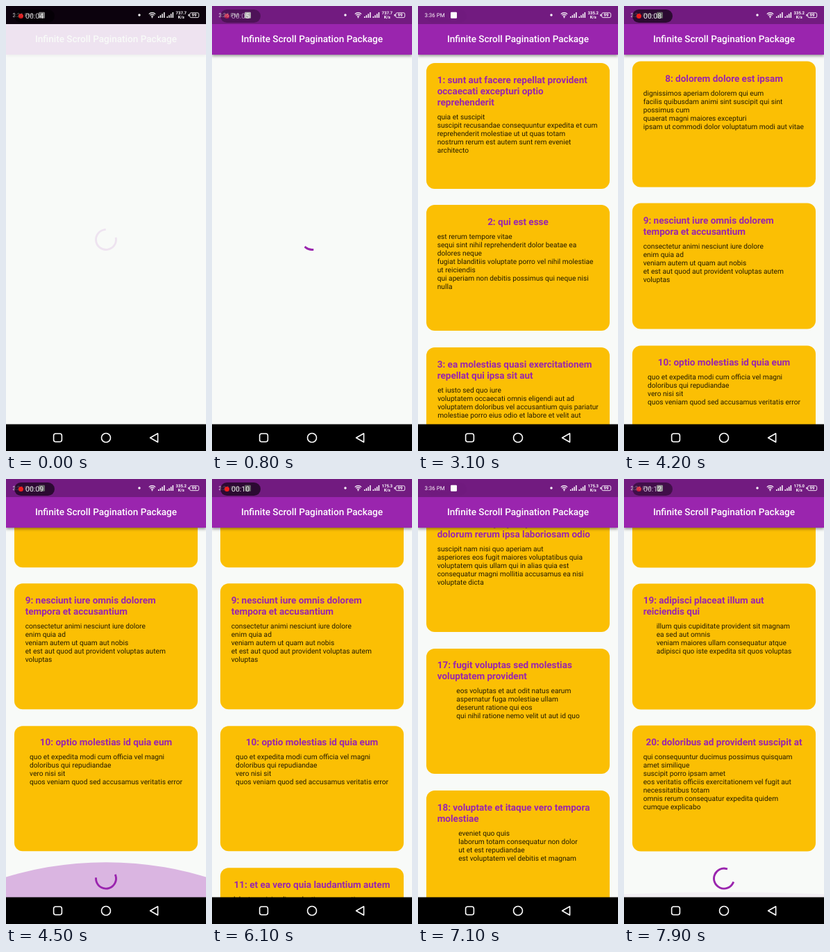
Write an HTML page that moves like this. It is 288 by 640 pixels and loops after 8 s.

```html
<!DOCTYPE html>
<html lang="en">
<head>
<meta charset="utf-8">
<title>Infinite scroll</title>
<style>
  html, body { margin: 0; width: 100%; height: 100%; overflow: hidden; }
  body { position: relative; background: #f8faf8; font-family: Roboto, Arial, sans-serif; text-rendering: geometricPrecision; }
  #app, #view { position: absolute; left: 0; top: 0; width: 288px; }
  #app { height: 640px; overflow: hidden; }
  #black { position: absolute; width: 288px; height: 25.5px; background: #000; }
  #fade { position: absolute; inset: 0; }
  #view { height: 601.5px; overflow: hidden; }
  #list { position: absolute; left: 0; top: 0; width: 288px; }
  .card { position: absolute; left: 11.73px; width: 264.54px; height: 180.8px; border-radius: 12px; background: #fbbf04;
    box-sizing: border-box; padding-top: 16.8px; display: flex; flex-direction: column; align-items: center; }
  .card > * { margin: 0; max-width: 232.6px; white-space: pre-line; }
  .card h2 { font: 700 13.5px/16px Roboto, Arial, sans-serif; color: #9a25ae; margin-bottom: 8px; }
  .card p { font-size: 10.2px; line-height: 12px; color: rgba(0, 0, 0, .86); }
  #bar { position: absolute; top: 25.5px; width: 288px; height: 44.5px; background: #9a25ae; color: #fff;
    box-shadow: 0 1.5px 4px rgba(0, 0, 0, .4); text-align: center; font-weight: 500; font-size: 13.55px; line-height: 45px; white-space: nowrap; }
  #status { position: absolute; width: 288px; height: 25.5px; background: #721b80; }
  svg { position: absolute; left: 0; top: 0; }
  #rec { position: absolute; left: 12px; top: 5px; width: 58px; height: 19px; border-radius: 10px; background: rgba(0, 0, 0, .62);
    color: #eee; font-size: 10.5px; line-height: 19px; text-indent: 16px; }
  #rec::before { content: ""; position: absolute; left: 5.5px; top: 6px; width: 7px; height: 7px; border-radius: 50%; background: #f01c1c; }
</style>
</head>
<body>
<div id="app">
  <div id="black"></div>
  <div id="fade">
    <div id="view">
      <div id="list"></div>
      <svg width="288" height="602">
        <g id="spinner"><circle id="arc" r="14.5" pathLength="360" fill="none" stroke="#9a25ae" stroke-width="2.9" stroke-linecap="square"/></g>
        <ellipse id="glow" cx="144" rx="432" fill="#9a25ae"/>
      </svg>
    </div>
    <div id="bar">Infinite Scroll Pagination Package</div>
    <div id="status"></div>
  </div>
  <svg width="288" height="640" fill="#fff" font-family="Roboto, Arial, sans-serif">
    <text x="9.5" y="16" font-size="7.9">3:36 PM</text>
    <rect x="47" y="8.7" width="9" height="9" rx="1.2"/>
    <circle cx="192" cy="13" r="1.7"/>
    <g fill="none" stroke="#fff" stroke-width="1.1">
      <path d="M205.8 11.6a6.5 6.5 0 0 1 9.4 0M207.4 13.4a4.3 4.3 0 0 1 6.2 0M209 15.1a2.2 2.2 0 0 1 3 0"/>
    </g>
    <circle cx="210.5" cy="16.4" r=".9"/>
    <g id="signal"></g>
    <g font-weight="700" text-anchor="middle">
      <text id="speed" x="252.3" y="12.3" font-size="6"></text>
      <text x="252.3" y="18.2" font-size="6">K/s</text>
      <text x="271" y="15.3" font-size="6">99</text>
    </g>
    <rect x="264.7" y="9.8" width="13" height="6.8" rx="1.8" fill="none" stroke="#fff" stroke-width=".9"/>
    <rect x="262.4" y="11.7" width="1.4" height="3" rx=".6"/>
    <rect y="601.5" width="288" height="38.5" fill="#000"/>
    <g fill="none" stroke="#fff" stroke-width="1.6" stroke-linejoin="round">
      <rect x="68.6" y="615" width="11.8" height="11.8" rx="3"/>
      <circle cx="144" cy="621" r="6.5"/>
      <path d="M207.6 621L218.6 614.8V627.2Z"/>
    </g>
  </svg>
  <div id="rec"></div>
</div>
<script>
const LOOP = 8000, STEP = 100, PITCH = 204.27, TOP = 82.2;
const SHOWN = 2900, MORE = 5500;
const END1 = TOP + 9 * PITCH - 354.8, END2 = TOP + 19 * PITCH - 354.8;
const flings = [
  { at: 3350, stop: 4300, from: 0, to: END1, v: 2 },
  { at: 6250, stop: 7885, from: END1, to: END2, v: 2.4235 }
];

// title / body lines
const posts = `sunt aut facere repellat provident occaecati excepturi optio reprehenderit/quia et suscipit/suscipit recusandae consequuntur expedita et cum reprehenderit molestiae ut ut quas totam/nostrum rerum est autem sunt rem eveniet architecto
qui est esse/est rerum tempore vitae/sequi sint nihil reprehenderit dolor beatae ea dolores neque/fugiat blanditiis voluptate porro vel nihil molestiae ut reiciendis/qui aperiam non debitis possimus qui neque nisi nulla
ea molestias quasi exercitationem repellat qui ipsa sit aut/et iusto sed quo iure/voluptatem occaecati omnis eligendi aut ad/voluptatem doloribus vel accusantium quis pariatur/molestiae porro eius odio et labore et velit aut
eum et est occaecati/ullam et saepe reiciendis voluptatem adipisci/sit amet autem assumenda provident rerum culpa/quis hic commodi nesciunt rem tenetur doloremque ipsam iure/quis sunt voluptatem rerum illo velit
nesciunt quas odio/repudiandae veniam quaerat sunt sed/alias aut fugiat sit autem sed est/voluptatem omnis possimus esse voluptatibus quis/est aut tenetur dolor neque
dolorem eum magni eos aperiam quia/ut aspernatur corporis harum nihil quis provident sequi/mollitia nobis aliquid molestiae/perspiciatis et ea nemo ab reprehenderit accusantium quas/voluptate dolores velit et doloremque molestiae
magnam facilis autem/dolore placeat quibusdam ea quo vitae/magni quis enim qui quis quo nemo aut saepe/quidem repellat excepturi ut quia/sunt ut sequi eos ea sed quas
dolorem dolore est ipsam/dignissimos aperiam dolorem qui eum/facilis quibusdam animi sint suscipit qui sint possimus cum/quaerat magni maiores excepturi/ipsam ut commodi dolor voluptatum modi aut vitae
nesciunt iure omnis dolorem tempora et accusantium/consectetur animi nesciunt iure dolore/enim quia ad/veniam autem ut quam aut nobis/et est aut quod aut provident voluptas autem voluptas
optio molestias id quia eum/quo et expedita modi cum officia vel magni/doloribus qui repudiandae/vero nisi sit/quos veniam quod sed accusamus veritatis error
et ea vero quia laudantium autem/delectus reiciendis molestiae occaecati non minima eveniet qui voluptatibus/accusamus in eum beatae sit/vel qui neque voluptates ut commodi qui incidunt/ut animi commodi
in quibusdam tempore odit est dolorem/itaque id aut magnam/praesentium quia et ea odit et ea voluptas et/sapiente quia nihil amet occaecati quia id voluptatem/incidunt ea est distinctio odio
dolorum ut in voluptas mollitia et saepe quo animi/aut dicta possimus sint mollitia voluptas commodi quo doloremque/iste corrupti reiciendis voluptatem eius rerum/sit cumque quod eligendi laborum minima/perferendis recusandae assumenda consectetur porro architecto ipsum ipsam
voluptatem eligendi optio/fuga et accusamus dolorum perferendis illo voluptas/non doloremque neque facere/ad qui dolorum molestiae beatae/sed aut voluptas totam sit illum
eveniet quod temporibus/reprehenderit quos placeat/velit minima officia dolores impedit repudiandae molestiae nam/voluptas recusandae quis delectus/officiis harum fugiat vitae
sint suscipit perspiciatis velit dolorum rerum ipsa laboriosam odio/suscipit nam nisi quo aperiam aut/asperiores eos fugit maiores voluptatibus quia/voluptatem quis ullam qui in alias quia est/consequatur magni mollitia accusamus ea nisi voluptate dicta
fugit voluptas sed molestias voluptatem provident/eos voluptas et aut odit natus earum/aspernatur fuga molestiae ullam/deserunt ratione qui eos/qui nihil ratione nemo velit ut aut id quo
voluptate et itaque vero tempora molestiae/eveniet quo quis/laborum totam consequatur non dolor/ut et est repudiandae/est voluptatem vel debitis et magnam
adipisci placeat illum aut reiciendis qui/illum quis cupiditate provident sit magnam/ea sed aut omnis/veniam maiores ullam consequatur atque/adipisci quo iste expedita sit quos voluptas
doloribus ad provident suscipit at/qui consequuntur ducimus possimus quisquam amet similique/suscipit porro ipsam amet/eos veritatis officiis exercitationem vel fugit aut necessitatibus totam/omnis rerum consequatur expedita quidem cumque explicabo`.split("\n");

const $ = id => document.getElementById(id);
const clamp = x => Math.min(1, Math.max(0, x));
const decelerate = x => 1 - (1 - x) ** 2;

const cards = posts.map((post, i) => {
  const [title, ...lines] = post.split("/");
  const card = document.createElement("div");
  card.className = "card";
  card.style.top = TOP + i * PITCH + "px";
  const add = (tag, text) => card.appendChild(document.createElement(tag)).textContent = text;
  add("h2", `${i + 1}: ${title}`);
  add("p", lines.join("\n"));
  return $("list").appendChild(card);
});

// two signal meters of four bars
$("signal").innerHTML = [219, 231.5].map(x => [2, 3.8, 5.8, 8].map((h, i) =>
  `<rect x="${x + i * 2.7}" y="${17 - h}" width="1.5" height="${h}"/>`).join("")).join("");

// cubic-bezier(.4, 0, .2, 1)
function fastOutSlowIn(x) {
  let lo = 0, hi = 1;
  for (let i = 0; i < 20; i++) {
    const s = (lo + hi) / 2, r = 1 - s;
    if (1.2 * r * r * s + .6 * r * s * s + s ** 3 < x) lo = s; else hi = s;
  }
  return lo * lo * (3 - 2 * lo);
}

function scrollAt(t) {
  let pos = 0;
  for (const { at, stop, from, to, v } of flings) {
    if (t < at) break;
    const span = stop - at, u = Math.min(t - at, span);
    pos = from + v * u - (v * span - (to - from)) * (u / span) ** 2;
  }
  return pos;
}

function drawSpinner(t, scroll) {
  let age = -1, y = 336;
  if (t < SHOWN) age = t + 4675;
  else {
    const late = t >= MORE;
    age = t - (late ? 7400 : 4187);
    y = TOP + (late ? 19 : 9) * PITCH + 219.8 - scroll;
  }
  $("spinner").style.display = age < 0 ? "none" : "";
  if (age < 0) return;
  const phase = age / 1333 % 1;
  const head = fastOutSlowIn(clamp(phase * 2)), tail = fastOutSlowIn(clamp(phase * 2 - 1));
  const start = -90 + tail * 270 + phase * 90 + age / 2222 * 360;
  $("spinner").setAttribute("transform", `translate(144 ${y})`);
  $("arc").setAttribute("transform", `rotate(${start % 360})`);
  $("arc").setAttribute("stroke-dasharray", `${Math.max(.1, (head - tail) * 270)} 400`);
}

function drawGlow(t) {
  let power = 0;
  for (const { stop } of flings) {
    const u = t - stop;
    if (u > 0) power = u < 200 ? decelerate(u / 200) : 1 - decelerate(clamp((u - 200) / 600));
  }
  const scale = .87 * power, ry = 432 * scale;
  $("glow").setAttribute("ry", ry);
  $("glow").setAttribute("cy", 601.5 - 57.9 * scale + ry);
  $("glow").setAttribute("opacity", .32 * power);
}

function draw(t) {
  const scroll = scrollAt(t);
  $("fade").style.opacity = .1 + .9 * clamp(t / 300);
  $("list").style.transform = `translateY(${-scroll}px)`;
  cards.forEach((card, i) => card.style.display = t >= (i < 10 ? SHOWN : MORE) ? "" : "none");
  drawSpinner(t, scroll);
  drawGlow(t);
  $("speed").textContent = t < 1600 ? "737.7" : t < 4600 ? "335.2" : t < 7600 ? "175.3" : "175.0";
  $("rec").textContent = "00:" + String(4 + Math.floor((t + 700) / 1000)).padStart(2, "0");
  $("rec").style.opacity = clamp(.5 + .6 * Math.cos((t / 1000 - .3) * Math.PI));
}

const begin = performance.now();
function tick() {
  const t = performance.now() - begin + 20;
  draw(Math.floor(t / STEP) * STEP % LOOP);
  requestAnimationFrame(tick);
}
draw(0);
requestAnimationFrame(tick);
</script>
</body>
</html>
```
